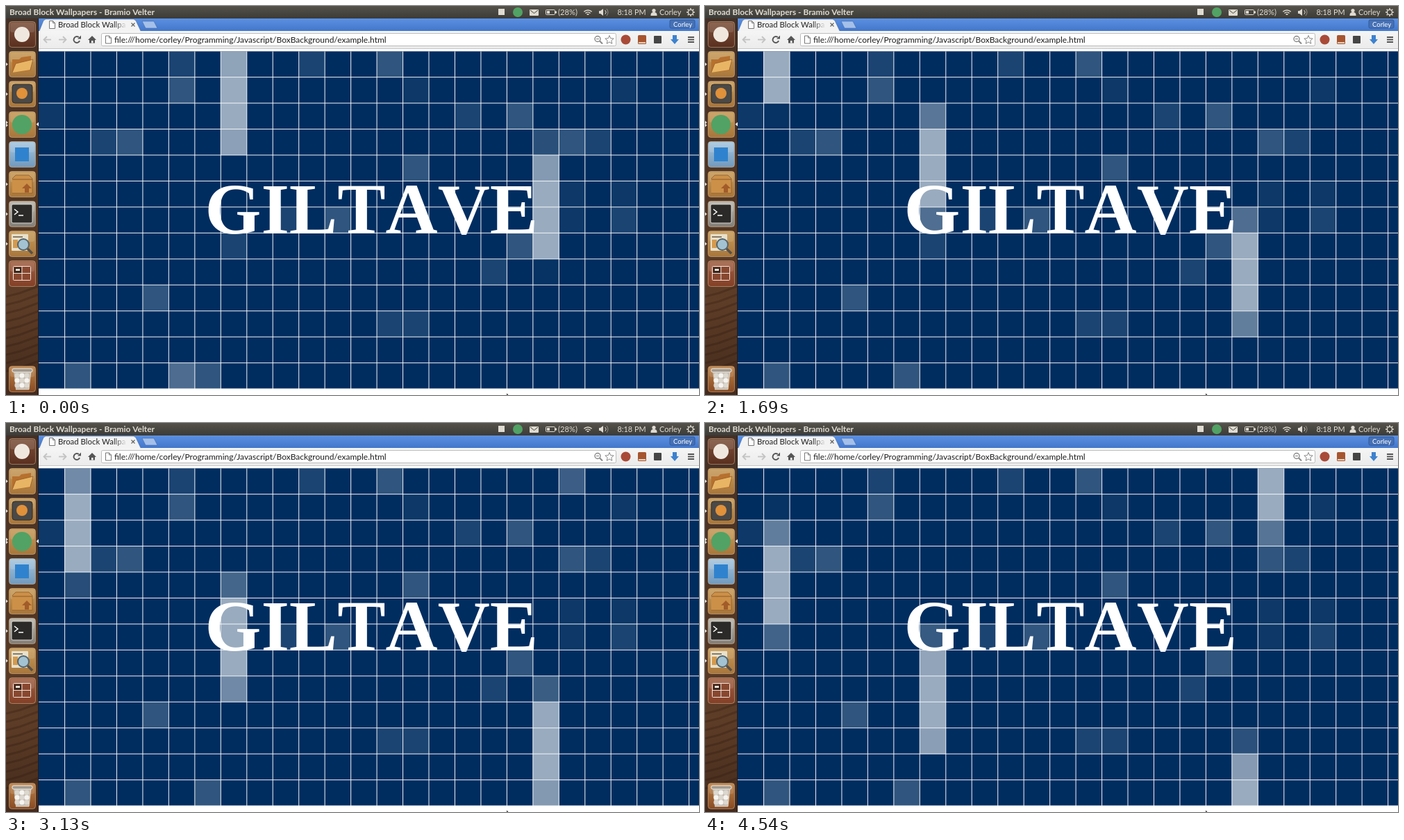
Write an HTML page with a canvas that moves like this. It is 998 px wide and 561 px high and loops after 4640 ms.

```html
<!DOCTYPE html>
<html lang="en">
<head>
<meta charset="utf-8">
<title>Broad Block Wallpapers</title>
<style>
html, body { margin: 0; width: 100%; height: 100%; overflow: hidden; background: #fff; }
canvas { display: block; }
</style>
</head>
<body>
<canvas id="stage" width="998" height="561"></canvas>
<script>
const ctx = document.getElementById('stage').getContext('2d');
const LOOP = 4640, FIRST_HOLD = 100, LAST = 4540;
const SIZE = 37.46, LEFT = 47.1, TOP = 65.15, ROWS = 13, COLS = 26;
const SANS = 'Lato, "Open Sans", sans-serif';

// Resting cells as [column, row]
const bright = [[13, 0], [5, 1], [18, 2], [3, 3], [20, 3], [14, 4], [11, 6], [18, 7], [4, 9], [1, 12], [6, 12]];
const dim = [[5, 0], [10, 0], [16, 2], [2, 3], [21, 3], [9, 6], [22, 6], [7, 7], [17, 8], [13, 10], [14, 10]];
const faint = [[14, 1], [22, 1], [0, 2], [20, 5], [22, 5], [20, 6]];

// Streaks fall one row per STEP; each cell lights up, then dims LAG later
const STEP = 650, LAG = 2700, RISE = 650, FALL = 1100, PEAK = 0.6;
const streaks = [
  { col: 1, start: 690 },
  { col: 5, start: -10500 },
  { col: 7, start: -2220 },
  { col: 19, start: -4900 },
  { col: 20, start: 3200 }
];

// 0 to 1 over `span`, half way at `mid`
const ramp = (t, mid, span) => Math.min(1, Math.max(0, (t - mid) / span + .5));

function glow(t, start, row) {
  const mid = start + row * STEP;
  return PEAK * ramp(t, mid, RISE) * (1 - ramp(t, mid + LAG, FALL));
}

function box(x, y, w, h, fill) {
  ctx.fillStyle = fill;
  ctx.fillRect(x, y, w, h);
}
function round(x, y, w, h, r, fill, stroke) {
  ctx.beginPath();
  ctx.roundRect(x, y, w, h, r);
  paint(fill, stroke);
}
function disc(x, y, r, fill, stroke, width) {
  ctx.beginPath();
  ctx.arc(x, y, r, 0, 7);
  paint(fill, stroke, width);
}
function path(points, fill, stroke, width) {
  ctx.beginPath();
  points.forEach(([x, y]) => ctx.lineTo(x, y));
  paint(fill, stroke, width);
}
function paint(fill, stroke, width = 1) {
  if (fill) { ctx.fillStyle = fill; ctx.fill(); }
  if (stroke) { ctx.strokeStyle = stroke; ctx.lineWidth = width; ctx.stroke(); }
}
function arc(x, y, r, from, to, stroke, width) {
  ctx.beginPath();
  ctx.arc(x, y, r, from, to);
  paint(null, stroke, width);
}
function text(str, x, y, size, fill, weight = 400, family = SANS) {
  ctx.font = `${weight} ${size}px ${family}`;
  ctx.fillStyle = fill;
  ctx.fillText(str, x, y);
}
function shade(y0, y1, ...colors) {
  const g = ctx.createLinearGradient(0, y0, 0, y1);
  colors.forEach((c, i) => g.addColorStop(i / (colors.length - 1), c));
  return g;
}
function gear(x, y, r, color) {
  disc(x, y, r * .6, null, color, 1.4);
  for (let i = 0; i < 8; i++) {
    const c = Math.cos(i * Math.PI / 4), s = Math.sin(i * Math.PI / 4);
    path([[x + c * r * .7, y + s * r * .7], [x + c * r, y + s * r]], null, color, 1.6);
  }
}
function star(x, y, r) {
  const points = [];
  for (let i = 0; i <= 10; i++) {
    const d = i % 2 ? r * .45 : r, a = i * Math.PI / 5 - Math.PI / 2;
    points.push([x + d * Math.cos(a), y + d * Math.sin(a)]);
  }
  path(points, '#fff', '#888');
}
function pageIcon(x, y) {
  path([[x, y], [x + 5, y], [x + 8, y + 3], [x + 8, y + 11], [x, y + 11], [x, y]], '#fff', '#777');
  path([[x + 5, y], [x + 5, y + 3], [x + 8, y + 3]], null, '#777');
}

function panel() {
  const ink = '#dfdbd2';
  box(0, 0, 998, 18, shade(0, 18, '#55524b', '#3c3b37'));
  text('Broad Block Wallpapers - Bramio Velter', 5, 12.7, 11.9, ink, 700);
  box(709, 4, 9, 9, ink);
  disc(737, 9, 7, '#51a264');
  round(754, 5, 13, 9, 1, ink);
  path([[755, 6], [760.5, 10.5], [766, 6]], null, '#45433e');
  round(777.5, 5.5, 13, 7, 1, null, ink);
  box(791, 7.5, 2, 3, ink);
  box(779, 7, 4, 4, ink);
  text('(28%)', 795, 12.7, 11.2, ink);
  for (const r of [2, 5, 8]) arc(838, 14, r, -2.35, -.79, ink, 1.5);
  path([[854, 7], [856, 7], [860, 4], [860, 14], [856, 11], [854, 11]], ink);
  arc(860, 9, 4, -.8, .8, ink, 1);
  arc(860, 9, 7, -.8, .8, '#98958d', 1);
  text('8:18 PM', 880.5, 12.7, 10.9, ink);
  disc(933, 6.5, 2.6, ink);
  round(928.5, 9, 9, 5, [4, 4, 0, 0], ink);
  text('Corley', 941, 12.7, 11, ink);
  gear(986, 9, 6, ink);
}

function tabs() {
  box(47, 18, 951, 18, shade(18, 36, '#5b90e2', '#4377ca'));
  path([[48, 36], [54, 21], [57, 19], [184, 19], [187, 21], [194, 36]], '#f3f3f3', '#416aa8', .6);
  pageIcon(62.5, 21.5);
  ctx.save();
  ctx.beginPath();
  ctx.rect(74, 19, 99, 17);
  ctx.clip();
  text('Broad Block Wallpapers', 75, 31, 11.4, '#222');
  const fade = ctx.createLinearGradient(155, 0, 174, 0);
  fade.addColorStop(0, 'rgba(243,243,243,0)');
  fade.addColorStop(1, '#f3f3f3');
  box(155, 20, 19, 16, fade);
  ctx.restore();
  path([[180.5, 24.5], [185.5, 29.5]], null, '#666', 1.3);
  path([[185.5, 24.5], [180.5, 29.5]], null, '#666', 1.3);
  path([[196, 22], [213, 22], [218, 32], [201, 32], [196, 22]], '#a4c0ea', '#4169a9', .6);
  round(956, 20, 36, 12, 2, '#4671b5', '#315b9f');
  text('Corley', 961, 29.5, 9.5, '#fff');
}

function toolbar() {
  box(47, 36, 951, 26, shade(36, 62, '#f5f5f5', '#ebebeb'));
  box(47, 61, 951, 1, '#c6c6c6');
  box(47, 62, 951, 4, '#fff');
  for (const [x, d] of [[60, 1], [81, -1]]) {
    path([[x - 5, 48.5], [x + 5, 48.5]], null, '#c3c3c3', 1.8);
    path([[x - d, 44], [x - 5.5 * d, 48.5], [x - d, 53]], null, '#c3c3c3', 1.8);
  }
  arc(102, 48.5, 4.4, .4, 5.4, '#555', 2);
  path([[103, 47.5], [108, 47.5], [108, 42.5]], '#555');
  path([[118, 49], [124, 43], [130, 49]], '#555');
  box(120, 48.5, 8, 5, '#555');
  box(123, 50, 2.5, 3.5, '#f0f0f0');
  round(137.5, 39.5, 741, 18, 2, '#fff', '#bcbcbc');
  pageIcon(143.5, 43);
  text('file:///home/corley/Programming/Javascript/BoxBackground/example.html', 156, 52.5, 12, '#1c1c1c');
  disc(852, 47.5, 4, null, '#888', 1.4);
  path([[855, 50.5], [859, 54.5]], null, '#888', 2);
  path([[850, 47.5], [854, 47.5]], null, '#888');
  star(869, 49, 6.5);
  disc(892.5, 48.5, 7, '#a94a38');
  round(910, 42, 12, 13, 1.5, '#a6552f');
  box(911, 52, 10, 2, '#e5cdb9');
  round(933, 43, 11, 11, 1, '#454545');
  path([[960, 42], [966, 42], [966, 48], [969, 48], [963, 55], [957, 48], [960, 48]], '#3d82cf');
  for (const y of [44, 47.5, 51]) box(982, y, 9, 2, '#555');
}

function tile(y, top, bottom) {
  round(4.5, y + .5, 38, 37, 4, shade(y, y + 38, top, bottom), 'rgba(235,205,165,.45)');
  round(6, y + 2, 35, 14, 3, 'rgba(255,255,255,.12)');
}

function wood() {
  box(0, 18, 47, 543, shade(18, 561, '#443026', '#4d3424', '#523623', '#5e3d27', '#432a1c'));
  for (let y = 410; y < 520; y += 12)
    path([[0, y + 9], [20, y + 4], [47, y - 6]], null, 'rgba(45,26,16,.3)', 3);
  box(46, 18, 1, 543, '#2c1c15');
}

function launcher() {
  const tan = ['#c69a58', '#a8763b'];
  wood();
  tile(22, '#7d513b', '#5b2f1f');
  disc(23, 41, 11, '#f0e8df');
  tile(65, ...tan);
  path([[9, 77], [19, 77], [22, 74], [36, 72], [36, 93], [9, 96]], '#b7702e');
  path([[9, 96], [14, 83], [39, 77], [35, 92]], '#e8b565', '#925b27', .8);
  tile(108, ...tan);
  round(9, 113, 29, 27, 4, '#4b4947', '#2e2c2a');
  disc(23, 126, 8, '#e0913a');
  tile(152, ...tan);
  disc(23, 171, 14, '#51a264');
  tile(195, '#a5c5dd', '#7199bc');
  box(13, 204, 20, 20, '#2f83ce');
  tile(238, ...tan);
  path([[9, 249], [14, 244], [33, 244], [38, 249], [38, 270], [9, 270]], '#cc9048', '#8c5b2b', .8);
  path([[9, 250], [38, 250]], null, '#8c5b2b');
  path([[30, 256], [37, 263], [33, 263], [33, 269], [27, 269], [27, 263], [23, 263]], '#a15c2a');
  tile(281, '#b8b4aa', '#827e77');
  round(8, 286, 30, 27, 2, '#2b2a29', '#dad6ce');
  path([[12, 293], [17, 297], [12, 301]], null, '#fff', 1.5);
  path([[18, 302], [25, 302]], null, '#fff', 1.5);
  tile(324, ...tan);
  round(8, 329, 24, 24, 1, '#e8e1cc');
  box(10, 332, 14, 2, '#8a7b65');
  box(10, 337, 7, 12, '#d59a4e');
  disc(25, 344, 8, '#a4c3d2', '#53656d', 2);
  path([[31, 350], [38, 357]], null, '#55504b', 3.5);
  tile(367, '#a06044', '#833f27');
  round(10.5, 375.5, 25, 20, 1, '#88472f', '#f1e3d8');
  path([[23, 376], [23, 395]], null, '#f1e3d8');
  path([[11, 385.5], [35, 385.5]], null, '#f1e3d8');
  box(12, 377, 10, 8, '#37231b');
  box(14, 379, 6, 3, '#e9ddd2');
  tile(519, '#bc8248', '#874a22');
  path([[11, 526], [36, 526], [33, 553], [14, 553]], '#c5bdb3', '#ede7dd', .8);
  for (let i = 0; i < 9; i++) disc(16 + i % 3 * 7, 533 + Math.floor(i / 3) * 7, 3.6, i % 2 ? '#f6f4ef' : '#dcd7ce');
  round(9, 523, 29, 5, 2, '#a19a90', '#f0ebe2');

  for (const y of [84, 127, 168, 172, 257, 300, 343])
    path([[0, y - 2.5], [3, y], [0, y + 2.5]], '#dfd7cd');
  path([[47, 167.5], [43.5, 170.5], [47, 173.5]], '#f3eee8');
}

function cell(col, row, alpha) {
  box(LEFT + col * SIZE, TOP + row * SIZE, SIZE, SIZE, `rgba(255,255,255,${alpha})`);
}

function page(t) {
  const height = ROWS * SIZE, line = 'rgba(255,255,255,.86)';
  ctx.save();
  ctx.beginPath();
  ctx.rect(47, 65.5, 951, 496);
  ctx.clip();
  box(47, 65, 951, 496, '#fff');
  box(47, 65, 951, height - .4, '#002d60');

  const level = new Map();
  const raise = (col, row, alpha) => {
    const key = row * COLS + col;
    level.set(key, Math.max(alpha, level.get(key) || 0));
  };
  for (const [cells, alpha] of [[bright, .19], [dim, .11], [faint, .05]])
    for (const [col, row] of cells) raise(col, row, alpha);
  for (const { col, start } of streaks)
    for (let row = 0; row < ROWS; row++) raise(col, row, glow(t, start, row));
  for (const [key, alpha] of level) cell(key % COLS, Math.floor(key / COLS), alpha);

  for (let c = 1; c < COLS; c++) box(LEFT + c * SIZE - .55, TOP, 1.1, height, line);
  for (let r = 1; r < ROWS; r++) box(47, TOP + r * SIZE - .55, 951, 1.1, line);

  ctx.fontKerning = 'none';
  text('GILTAVE', 286.5, 327.5, 104, '#fff', 700, '"Liberation Serif", "Times New Roman", serif');
  ctx.fontKerning = 'auto';
  path([[721, 558.5], [723.5, 561], [721, 561]], '#333');
  ctx.restore();
}

panel();
tabs();
toolbar();
launcher();

const begin = performance.now();
function frame() {
  const t = (performance.now() - begin) % LOOP;
  page(t < FIRST_HOLD ? 0 : Math.min(t, LAST));
  requestAnimationFrame(frame);
}
frame();
</script>
</body>
</html>
```
